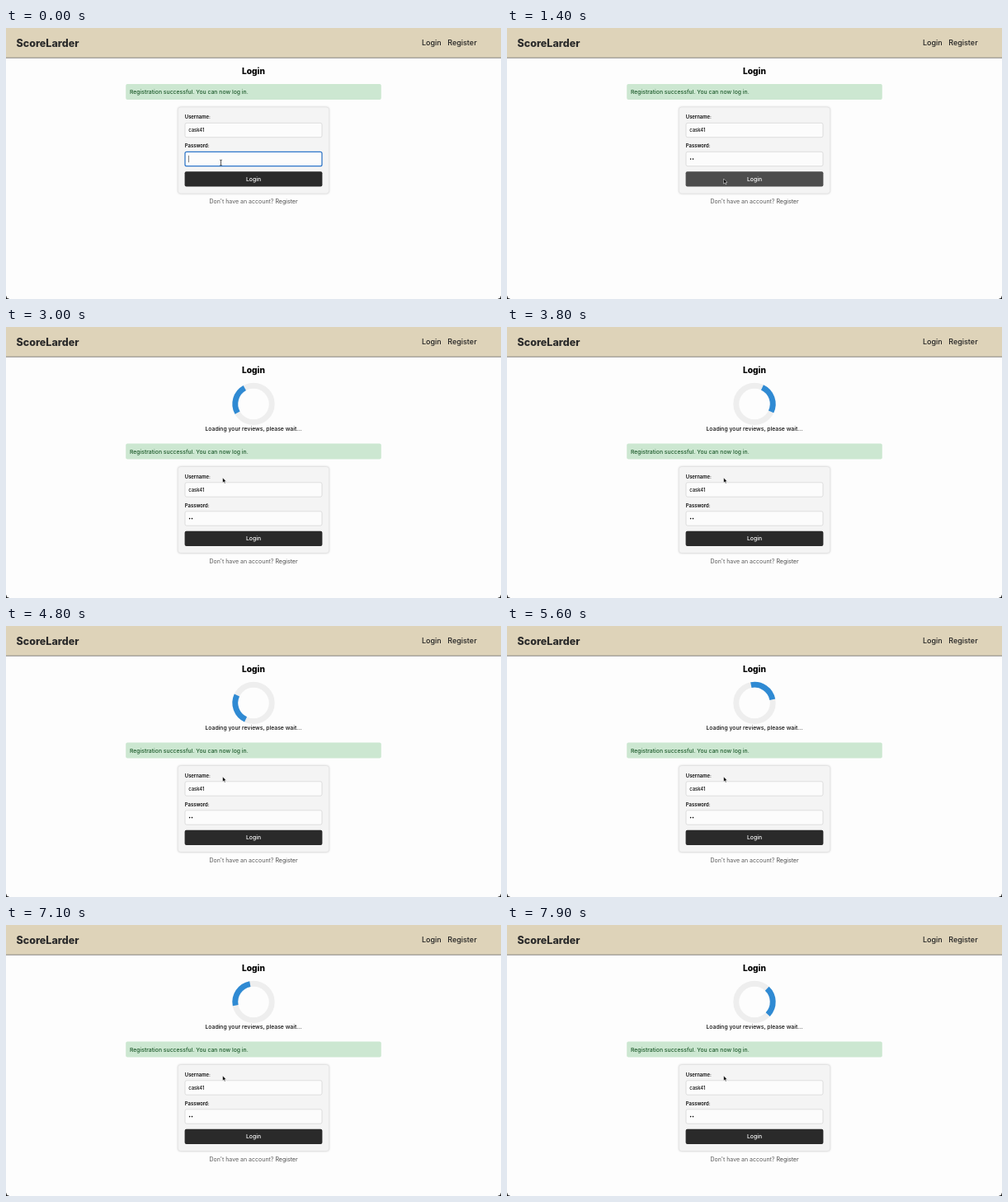
An HTML page that plays this animation: 600 by 329 pixels, repeating every 8 s.

```html
<!DOCTYPE html>
<html lang="en">
<head>
<meta charset="utf-8">
<title>Login</title>
<style>
  html, body { margin: 0; width: 100%; height: 100%; overflow: hidden; background: #fdfdfd; }
  svg { display: block; width: 100vw; height: 100vh; }
  text { font-family: Inter, "Open Sans", sans-serif; font-size: 6.85px; font-weight: 500; fill: #0c0c0c; }
  .mid { text-anchor: middle; }
  .brand { font-size: 12.5px; font-weight: 800; fill: #2b2b2b; }
  .nav { font-size: 9px; fill: #222; }
  .title { font-size: 10.2px; font-weight: 800; fill: #000; }
  .label { font-size: 5.9px; font-weight: 600; }
  .value { font-size: 5.9px; }
  .field { fill: #fcfcfc; stroke: #ccc; stroke-width: .6; }
  .card { fill: #f4f4f4; stroke: #dedede; stroke-width: .6; filter: drop-shadow(0 .8px 1.2px rgba(0, 0, 0, .16)); }
</style>
</head>
<body>
<svg viewBox="0 0 600 329">
  <rect width="600" height="329" fill="#fdfdfd"/>
  <rect width="600" height="36" fill="#ded3b9"/>
  <rect y="35.7" width="600" height="1" fill="#85817d"/>
  <text class="brand" x="12.5" y="22.6">ScoreLarder</text>
  <text class="nav" x="503.9" y="21.4">Login</text>
  <text class="nav" x="535.2" y="21.4">Register</text>
  <text class="title mid" x="300" y="55.6">Login</text>

  <g id="loader">
    <g fill="none" stroke-width="6.9" transform="translate(300 93.4)">
      <circle r="22.2" stroke="#eee"/>
      <path id="arc" d="M-15.7-15.7A22.2 22.2 0 0 1 15.7-15.7" stroke="#2f8ad3"/>
    </g>
    <text class="mid" x="300" y="126.2">Loading your reviews, please wait...</text>
  </g>

  <g id="page">
    <rect x="145.2" y="68" width="309.6" height="19" rx="2" fill="#cce7d1"/>
    <text x="149.9" y="80" style="fill:#1d5a2b">Registration successful. You can now log in.</text>
    <rect class="card" x="208.3" y="96" width="183.4" height="105" rx="3.5"/>
    <text class="label" x="216.8" y="110.4">Username:</text>
    <rect class="field" x="217" y="115.3" width="166" height="17.4" rx="2"/>
    <text class="value" x="221.2" y="126">cask41</text>
    <text class="label" x="216.8" y="145.4">Password:</text>
    <rect class="field" x="217" y="150.3" width="166" height="17.4" rx="2"/>
    <rect id="ring" x="217" y="150.3" width="166" height="17.4" rx="2" fill="none" stroke="#2f78cc" stroke-width="1.2"/>
    <circle class="dot" cx="222.6" cy="159.1" r=".8"/>
    <circle class="dot" cx="225.5" cy="159.1" r=".8"/>
    <rect id="caret" y="154.8" width=".5" height="8.4"/>
    <rect id="button" x="216.6" y="174.3" width="166.8" height="18.2" rx="2"/>
    <text class="mid" x="300" y="185.9" style="fill:#fff">Login</text>
    <text class="mid" x="300" y="213.2" style="font-weight:400;font-size:7.02px;fill:#5c5c5c">Don't have an account? <tspan fill="#4c4c4c">Register</tspan></text>
  </g>

  <path id="beam" d="M-1.3-3.4Q0-3.4 0-2.6Q0-3.4 1.3-3.4M0-2.6V2.6M-1.3 3.4Q0 3.4 0 2.6Q0 3.4 1.3 3.4" fill="none" stroke="#111" stroke-width=".7"/>
  <path id="arrow" d="M0 0V6.1L1.4 4.8L2.4 7L3.4 6.6L2.4 4.4H4.3Z" fill="#000" stroke="#fff" stroke-width=".5"/>
  <path d="M0 325.5V329H3.5Q0 329 0 325.5M600 325.5V329H596.5Q600 329 600 325.5" fill="#000" stroke="#000" stroke-width=".5"/>
</svg>
<script>
const LOOP = 8000, STEP = 100;
const HOVER = 1200, BLUR = 1400, LOAD = 1500, SPIN_START = 1410, SPIN_PERIOD = 2000;
const DOT_TIMES = [500, 700];
const POINTER = [[0, 260.5, 163.5], [900, 260.5, 163.5], [1000, 261, 169.5], [1100, 262, 178], [1200, 262.6, 183]];

const $ = id => document.getElementById(id);
const dots = document.querySelectorAll('.dot');
const show = (el, on) => el.setAttribute('visibility', on ? 'visible' : 'hidden');
const move = (el, x, y) => el.setAttribute('transform', `translate(${x} ${y})`);
const clamp = v => Math.min(1, Math.max(0, v));

function pointerAt(t) {
  const next = POINTER.findIndex(p => p[0] > t);
  if (next < 0) return POINTER.at(-1).slice(1);
  const [t0, x0, y0] = POINTER[next - 1], [t1, x1, y1] = POINTER[next];
  const k = (t - t0) / (t1 - t0);
  return [x0 + (x1 - x0) * k, y0 + (y1 - y0) * k];
}

function render(t) {
  const loading = t >= LOAD, focused = t < BLUR;
  show($('loader'), loading);
  move($('page'), 0, loading ? 73.5 : 0);
  $('arc').setAttribute('transform', `rotate(${(t - SPIN_START) / SPIN_PERIOD * 360})`);

  const typed = DOT_TIMES.filter(d => t >= d).length;
  dots.forEach((dot, i) => show(dot, i < typed));
  show($('ring'), focused);
  show($('caret'), focused && t < HOVER);
  $('caret').setAttribute('x', 221.4 + typed * 3);

  // The button colour eases in on hover and back out once the form moves away.
  const glow = loading ? 1 - clamp((t - LOAD + STEP) / 300) : clamp((t - HOVER + STEP) / 300);
  const shade = Math.round(42 + 35 * glow);
  $('button').setAttribute('fill', `rgb(${shade},${shade},${shade})`);

  const [x, y] = pointerAt(t);
  const overText = y < 169;
  show($('beam'), overText && (t < DOT_TIMES[0] || t >= 900));
  show($('arrow'), !overText);
  move($('beam'), x, y);
  move($('arrow'), x, y);
}

function tick() {
  const t = Math.floor(performance.now() % LOOP / STEP) * STEP;
  render(t < 300 ? 0 : t);
  requestAnimationFrame(tick);
}
tick();
</script>
</body>
</html>
```
